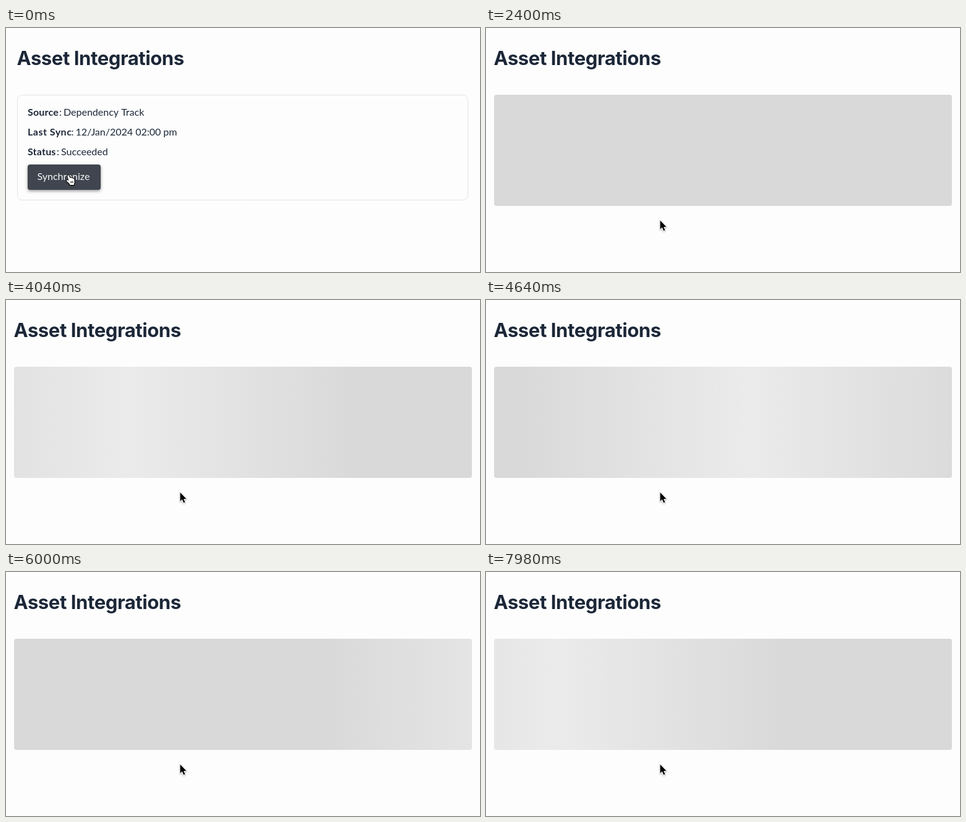
Write an HTML page with a canvas that moves like this. It is 766 by 395 pixels and loops after 8000 ms.

```html
<!DOCTYPE html>
<html lang="en">
<head>
<meta charset="utf-8">
<title>Asset Integrations</title>
<style>
  html, body { margin: 0; width: 100%; height: 100%; overflow: hidden; background: #fdfdfd; }
  canvas { display: block; width: 766px; height: 395px; }
</style>
</head>
<body>
<canvas id="stage"></canvas>
<script>
const W = 766, H = 395, LOOP = 8000;
// The picture advances in steps lasting 100, 20 and 20 ms in turn.
const CYCLE = 140, OFFSET = 20;
const LOAD_STEP = 21, STILL_STEP = 23, RESUME_AT = 2400;
const WAVE_STEP = 51.4, WAVE_STEPS = 90;
const BOX = { x: 13, y: 108, w: 740, h: 180 };
const INK = '#1c2738';

const canvas = document.getElementById('stage');
const ctx = canvas.getContext('2d');
const dpr = window.devicePixelRatio || 1;
canvas.width = W * dpr;
canvas.height = H * dpr;

const clamp = v => Math.min(1, Math.max(0, v));
const ease = v => v * v * (3 - 2 * v);

function stepAt(t) {
  const n = Math.floor((t - OFFSET) / CYCLE);
  const phase = t - OFFSET - n * CYCLE;
  const step = n * 3 + (phase < 100 ? 0 : phase < 120 ? 1 : 2);
  return t < RESUME_AT ? Math.min(step, STILL_STEP) : step;
}

function text(str, x, y, font, color, spacing = 0) {
  ctx.font = font;
  ctx.letterSpacing = spacing + 'px';
  ctx.fillStyle = color;
  ctx.fillText(str, x, y);
}

function roundBox(x, y, w, h, r) {
  ctx.beginPath();
  ctx.roundRect(x, y, w, h, r);
}

function title(x) {
  text('Asset Integrations', x - 0.5, 60, '700 31px Inter, sans-serif', INK, -0.4);
}

function row(label, colonX, value, valueX, y, spacing) {
  text(label, 35, y, '700 16px Lato, sans-serif', INK, spacing);
  text(':', colonX, y, '16px Lato, sans-serif', INK);
  text(value, valueX, y, '16px Lato, sans-serif', INK);
}

function card() {
  title(18);
  roundBox(18.5, 108.5, 728, 170, 8);
  ctx.strokeStyle = '#e1e3e6';
  ctx.lineWidth = 1;
  ctx.stroke();
  row('Source', 86, 'Dependency Track', 93, 142, 0.2);
  row('Last Sync', 105.5, '12/Jan/2024 02:00 pm', 112.5, 174, 0.5);
  row('Status', 82, 'Succeeded', 89, 206, 0.2);

  ctx.save();
  ctx.shadowColor = 'rgba(0, 0, 0, 0.4)';
  ctx.shadowBlur = 5 * dpr;
  ctx.shadowOffsetY = 2 * dpr;
  roundBox(35, 221, 118, 41, 4);
  ctx.fillStyle = '#40454f';
  ctx.fill();
  ctx.restore();
  text('Synchronize', 50.5, 246, '16px Lato, sans-serif', '#f8f8f8');
}

function waveCenter(step) {
  const rest = BOX.x + BOX.w / 2;
  if (step <= STILL_STEP) return rest;
  const p = Math.max(0, step - WAVE_STEP) / WAVE_STEPS % 1;
  return rest + BOX.w * (2 * p - 1);
}

function skeleton(step) {
  title(13);
  const c = waveCenter(step), half = BOX.w / 2;
  const g = ctx.createLinearGradient(c - half, 0, c + half, 0);
  g.addColorStop(0, '#d9d9d9');
  g.addColorStop(0.5, '#ebebeb');
  g.addColorStop(1, '#d9d9d9');
  roundBox(BOX.x, BOX.y, BOX.w, BOX.h, 4);
  ctx.fillStyle = g;
  ctx.fill();
}

const arrowShape = new Path2D('M0 0V14.2L3.2 11.3L5.6 16.8L7.9 15.8L5.6 10.4H10Z');
const handShape = new Path2D(
  'M-1.6 1.2C-1.9-.4 .4-.9 1 .8L2.4 4.4C3 3.4 4.4 3.6 4.8 4.6C5.6 3.8 6.7 4.2 7 5.2' +
  'C8 4.7 9 5.5 9.2 6.6L9.6 10.2C9.8 12 8.8 13 8.8 15.4H2.6C2.2 13.6-.8 11.4-2.8 9.4' +
  'C-4 8.1-2.4 6.8-1.2 7.8L.4 9Z');
const fingers = new Path2D('M3.7 9.6V12.6M5.4 9.4V12.5M7.1 9.2V12.4');

function pointer(shape, x, y, fill, edge) {
  ctx.save();
  ctx.translate(x, y);
  ctx.lineJoin = 'round';
  ctx.lineWidth = 2;
  ctx.strokeStyle = edge;
  ctx.shadowColor = 'rgba(0, 0, 0, 0.35)';
  ctx.shadowBlur = 2 * dpr;
  ctx.shadowOffsetY = dpr;
  ctx.stroke(shape);
  ctx.shadowColor = 'transparent';
  ctx.fillStyle = fill;
  ctx.fill(shape);
  if (shape === handShape) {
    ctx.lineWidth = 0.8;
    ctx.stroke(fingers);
  }
  ctx.restore();
}

function cursor(step) {
  const k = ease(clamp((step + 1) / 18));
  const x = 101 + 180.5 * k, y = 238.5 + 73 * k;
  const onButton = x < 153 && y < 262;
  if (onButton) pointer(handShape, x, y, '#ffffff', '#000000');
  else pointer(arrowShape, x, y, '#000000', '#ffffff');
}

function draw(t) {
  const step = stepAt(t);
  ctx.setTransform(dpr, 0, 0, dpr, 0, 0);
  ctx.fillStyle = '#fdfdfd';
  ctx.fillRect(0, 0, W, H);
  if (step < LOAD_STEP) card();
  else skeleton(step);
  cursor(step);
}

let begin;
function tick(now) {
  begin ??= now;
  draw((now - begin) % LOOP);
  requestAnimationFrame(tick);
}
requestAnimationFrame(tick);
</script>
</body>
</html>
```
